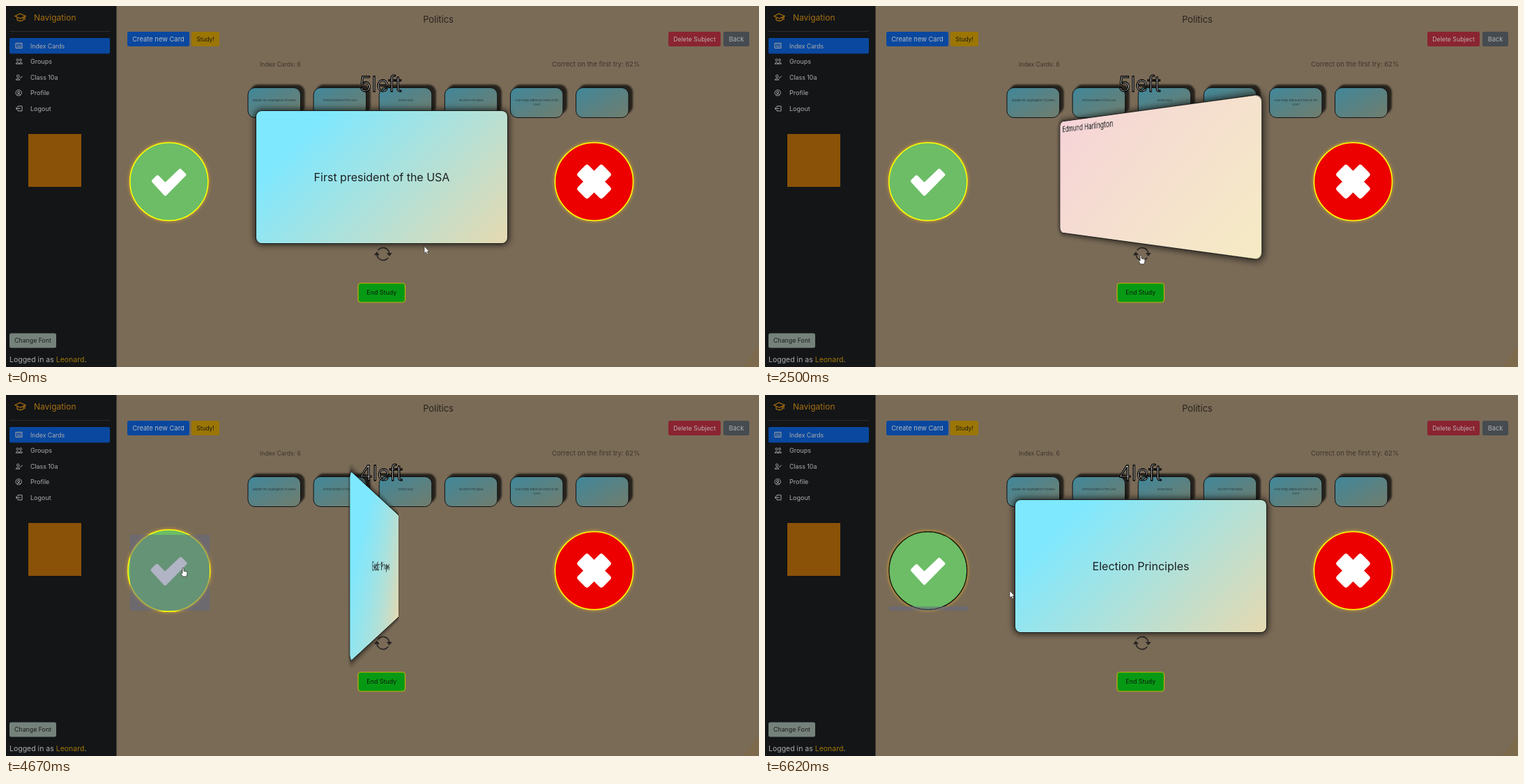
Animation of 1080x519 px, one loop 6.72 s. Source, as an HTML page:

```html
<!DOCTYPE html>
<html lang="en">
<head>
<meta charset="utf-8">
<title>Study cards</title>
<style>
  html, body { margin: 0; width: 100%; height: 100%; overflow: hidden; background: #7a6b57; }
  body { position: relative; font-family: Inter, "Open Sans", sans-serif; }
  svg { position: absolute; left: 0; top: 0; }
  #scene { position: absolute; left: 359px; top: 151px; width: 360px; height: 190px; perspective: 576px; }
  #card { width: 100%; height: 100%; transform-style: preserve-3d; }
  .face {
    position: absolute; inset: 0; box-sizing: border-box; border-radius: 8px;
    box-shadow: 0 0 0 1px #1c1d1b, 0 0 8px 3px rgba(0, 0, 0, .65); backface-visibility: hidden; color: #1c2022;
  }
  #front {
    display: flex; align-items: center; justify-content: center; font-size: 16px;
    background: linear-gradient(135deg, #7ee8ff 18%, #e6d9b0);
  }
  #back {
    padding: 5px 6px; font-size: 13.2px; line-height: 16px; transform: rotateY(180deg);
    background: linear-gradient(135deg, #f6d3d8, #f5dfcf 55%, #f5ebc4);
  }
</style>
</head>
<body>
<svg id="page" width="1080" height="519"></svg>
<div id="scene"><div id="card">
  <div class="face" id="front"></div>
  <div class="face" id="back">Edmund Harlington</div>
</div></div>
<svg width="1080" height="519">
  <g id="arrow"><path d="M0 0V10L2.3 8 4 11.5 5.6 10.8 4 7.4H7Z" fill="#fff" stroke="#222" stroke-width=".6"/></g>
  <g id="hand"><path d="M-1 1Q0-1 1 1V5L5.5 6.2Q6.3 6.6 6 8L5 13H-.5L-3.3 8.5Q-3 7-1 8.5Z" fill="#fff" stroke="#222" stroke-width=".7"/></g>
</svg>
<script>
const $ = id => document.getElementById(id);
const text = (x, y, size, fill, str, anchor = 'start') =>
  `<text x="${x}" y="${y}" font-size="${size}" fill="${fill}" text-anchor="${anchor}">${str}</text>`;
const box = (x, y, w, h, fill, r = 2, more = '') =>
  `<rect x="${x}" y="${y}" width="${w}" height="${h}" rx="${r}" fill="${fill}" ${more}/>`;
const button = (x, y, w, h, fill, color, size, str, r = 2.5, more) =>
  box(x, y, w, h, fill, r, more) + text(x + w / 2, y + h / 2 + 3.2, size, color, str, 'middle');

const blue = '#0a489f';
const menu = [
  ['Index Cards', 8.7, 'M0 0H9V7H0ZM2 2.3H4M5.5 2.3H7.5M2 4.7H7.5'],
  ['Groups', 9, 'M1 1.5a1.5 1.5 0 1 0 3 0a1.5 1.5 0 1 0-3 0M5.5 1.5a1.5 1.5 0 1 0 3 0a1.5 1.5 0 1 0-3 0M0 7Q2.5 2.5 5 7ZM5 7Q7 2.5 9.5 7Z'],
  ['Class 10a', 8.8, 'M1.5 2a1.7 1.7 0 1 0 3.4 0a1.7 1.7 0 1 0-3.4 0M0 7.5Q3 3 6 7.5ZM5.5 3.5L7 5 9.5 2'],
  ['Profile', 9, 'M0 3.5a4.2 4.2 0 1 0 8.4 0a4.2 4.2 0 1 0-8.4 0M2.7 2.7a1.5 1.5 0 1 0 3 0a1.5 1.5 0 1 0-3 0M1.5 6.5Q4.2 3.5 7 6.5'],
  ['Logout', 9, 'M3 2V0H9V7H3V5M6.5 3.5H0M2 1.7L0 3.5 2 5.3']
];
const questions = [['Explain the segregation of power'], ['First president of the USA'], ['Democracy'],
  ['Election Principles'], ['How many states are there in the', 'USA?'], []];

const sidebar = box(0, 0, 158.5, 519, '#131517', 0) +
  '<path d="M13 14.5L20 11 28 14.5 20.5 18ZM16 16.5V20Q20.5 23 25 20V16.5M27 15V20" fill="none" stroke="#a56c10" stroke-width="1.3"/>' +
  text(40, 21, 12, '#a56e12', 'Navigation') + box(5, 36, 144, 1, '#2b2d2f', 0) +
  box(5, 46, 144, 22.5, blue) +
  menu.map(([name, size, icon], i) => {
    const y = 60.5 + 22.6 * i;
    return `<path d="${icon}" transform="translate(14 ${y - 7})" fill="none" stroke="#a4a4a4"/>` +
      text(35, y, size, '#adadad', name);
  }).join('') +
  box(32, 184, 76, 76, '#8a5208', 0) +
  button(5, 470.5, 67, 21, '#75827b', '#1b1e1c', 8.8, 'Change Font') +
  text(5, 512, 10.5, '#adadad', 'Logged in as <tspan fill="#a07806">Leonard</tspan>.');

const header = text(620, 24, 12.9, '#29231c', 'Politics', 'middle') +
  button(174, 37, 89, 21, blue, '#b4b8be', 9.4, 'Create new Card') +
  button(266, 37, 40, 21, '#9c7605', '#1a1710', 8.4, 'Study!') +
  button(950, 37, 75, 21, '#8a2431', '#bcb0b0', 8.8, 'Delete Subject') +
  button(1029, 37, 37, 21, '#454b50', '#b0b0b0', 9.3, 'Back') +
  text(364, 86.5, 8.6, '#3d352a', 'Index Cards: 6') +
  text(783, 86.5, 9.5, '#3d352a', 'Correct on the first try: 62%');

const smallCards = questions.map((lines, i) => {
  const x = 347 + 94.1 * i;
  return box(x + 3.5, 113, 78, 42, '#25221f', 11, 'filter="url(#soft)"') +
    box(x, 117.5, 75.5, 43, 'url(#teal)', 10, 'stroke="#111"') +
    lines.map((s, j) => text(x + 38, 137 + 6 * j, 4, '#26373a', s, 'middle')).join('');
}).join('');

const round = (id, x, fill, mark) => `<g id="${id}" transform="translate(${x} 252.5)">
  <circle r="56" fill="${fill}" stroke="#ff0" stroke-width="1.5" filter="url(#glow)"/>${mark}</g>`;
const bar = a => box(-25.5, -11, 51, 22, '#fff', 4, `transform="rotate(${a})"`);

$('page').innerHTML = `<defs>
  <linearGradient id="teal" x2="1" y2="1"><stop stop-color="#40879a"/><stop offset="1" stop-color="#717d6d"/></linearGradient>
  <filter id="soft"><feGaussianBlur stdDeviation="1.3"/></filter>
  <filter id="glow" x="-20%" y="-20%" width="140%" height="140%"><feDropShadow dx="0" dy="0" stdDeviation="2.5" flood-color="#f0b428" flood-opacity=".85"/></filter>
  </defs>` + '<path d="M1080 488V519H1058Z" fill="#7d6a4c"/>' +
  sidebar + header + smallCards +
  `<text id="left" x="507" y="123" font-size="30" font-weight="300" fill="#fff" stroke="#000" stroke-width="1.3"></text>` +
  round('yes', 233.8, '#6cbd66', '<path d="M-22.3-.8L-16.5-6.7-5.5 4.5 16-16 22-10-5.3 17.8Z" fill="#fff" stroke="#fff" stroke-width="5" stroke-linejoin="round"/>') +
  round('no', 843.5, '#ec0000', bar(45) + bar(-45)) +
  box(178, 196, 114, 114, 'rgba(94,102,135,.49)', 0, 'id="tint"') +
  `<g transform="translate(527.8 343.5) scale(1.63)" fill="#292623">
    <path d="M11.5 7H15.5Q16 7 15.6 7.5L13.7 9.8Q13.5 10 13.3 9.8L11.4 7.5Q11 7 11.5 7ZM.5 9H4.5Q5 9 4.6 8.5L2.7 6.2Q2.5 6 2.3 6.2L.4 8.5Q0 9 .5 9Z"/>
    <path d="M3.75 4.5A5.5 5.5 0 0 1 13.4 7M2.6 9A5.5 5.5 0 0 0 12.25 11.5" fill="none" stroke="#292623" stroke-linecap="round"/>
  </g>` +
  button(505, 398.5, 67.5, 27.5, '#069a14', '#0b1a0c', 8.9, 'End Study', 4, 'stroke="#c8ac0a" stroke-width="1.2"');

// Bursts of screen updates: first time, last time, count
const bursts = [[0, 0, 1], [240, 310, 2], [580, 1210, 10], [1580, 1670, 2], [2260, 2500, 4], [2590, 2800, 4],
  [3570, 4160, 9], [4250, 4250, 1], [4490, 5090, 10], [5180, 5810, 9], [5900, 6560, 11], [6620, 6620, 1]];
const ticks = bursts.flatMap(([a, b, n]) =>
  Array.from({ length: n }, (_, i) => a + (b - a) * i / Math.max(1, n - 1)));

const pointer = [[0, 600, 345.5], [240, 599, 344.5], [310, 598, 344], [560, 598, 344], [1210, 538, 357], [1580, 538.5, 357.5],
  [1670, 539, 358], [3500, 539, 358], [3570, 533, 347], [4160, 255, 249], [4250, 254, 248], [5090, 254, 248],
  [5180, 257, 252], [5810, 314, 271], [6560, 351, 281.5]];
const tintTop = [[4490, 196], [5090, 236], [5180, 243], [5810, 284], [6560, 304]];
const pulse = [[4480, 1], [4490, 1.035], [4620, 1.05], [5090, 1]];

function tween(keys, t) {
  const i = keys.findIndex(k => k[0] > t);
  if (i < 1) return keys.at(i).slice(1);
  const a = keys[i - 1], b = keys[i], p = (t - a[0]) / (b[0] - a[0]), s = p * p * (3 - 2 * p);
  return a.slice(1).map((v, j) => v + (b[j + 1] - v) * s);
}

// The CSS "ease" curve
function ease(p) {
  if (p <= 0) return 0;
  if (p >= 1) return 1;
  const bez = (s, a, b) => 3 * (1 - s) ** 2 * s * a + 3 * (1 - s) * s * s * b + s ** 3;
  let lo = 0, hi = 1;
  for (let i = 0; i < 20; i++) {
    const mid = (lo + hi) / 2;
    if (bez(mid, .25, .25) < p) lo = mid; else hi = mid;
  }
  return bez(lo, .1, 1);
}

function draw(now) {
  const clock = now % 6720, t = ticks.findLast(x => x <= clock + .01);
  const answered = t >= 4490;

  const angle = 180 * (ease((t - 2237) / 550) - (answered ? ease((t - 4446) / 550) : 0));
  $('card').style.transform = `rotateY(${angle}deg)`;
  $('front').textContent = answered ? 'Election Principles' : 'First president of the USA';
  $('left').textContent = answered ? '4left' : '5left';

  const [scale] = t < 4480 ? [1] : tween(pulse, t);
  $('yes').setAttribute('transform', `translate(233.8 252.5) scale(${scale})`);
  $('yes').firstElementChild.setAttribute('stroke', t >= 5900 ? '#111' : '#ff0');
  const [top] = tween(tintTop, Math.max(t, 4490));
  $('tint').setAttribute('y', top);
  $('tint').setAttribute('height', answered ? 310 - top : 0);

  const [x, y] = tween(pointer, t);
  const link = Math.hypot(x - 233.8, y - 252.5) < 57 || (Math.abs(x - 541) < 14 && y > 343);
  for (const id of ['arrow', 'hand']) {
    $(id).setAttribute('transform', `translate(${x} ${y})`);
    $(id).setAttribute('visibility', (id === 'hand') === link ? 'visible' : 'hidden');
  }
}

const start = performance.now();
function loop() {
  draw(performance.now() - start);
  requestAnimationFrame(loop);
}
loop();
</script>
</body>
</html>
```
